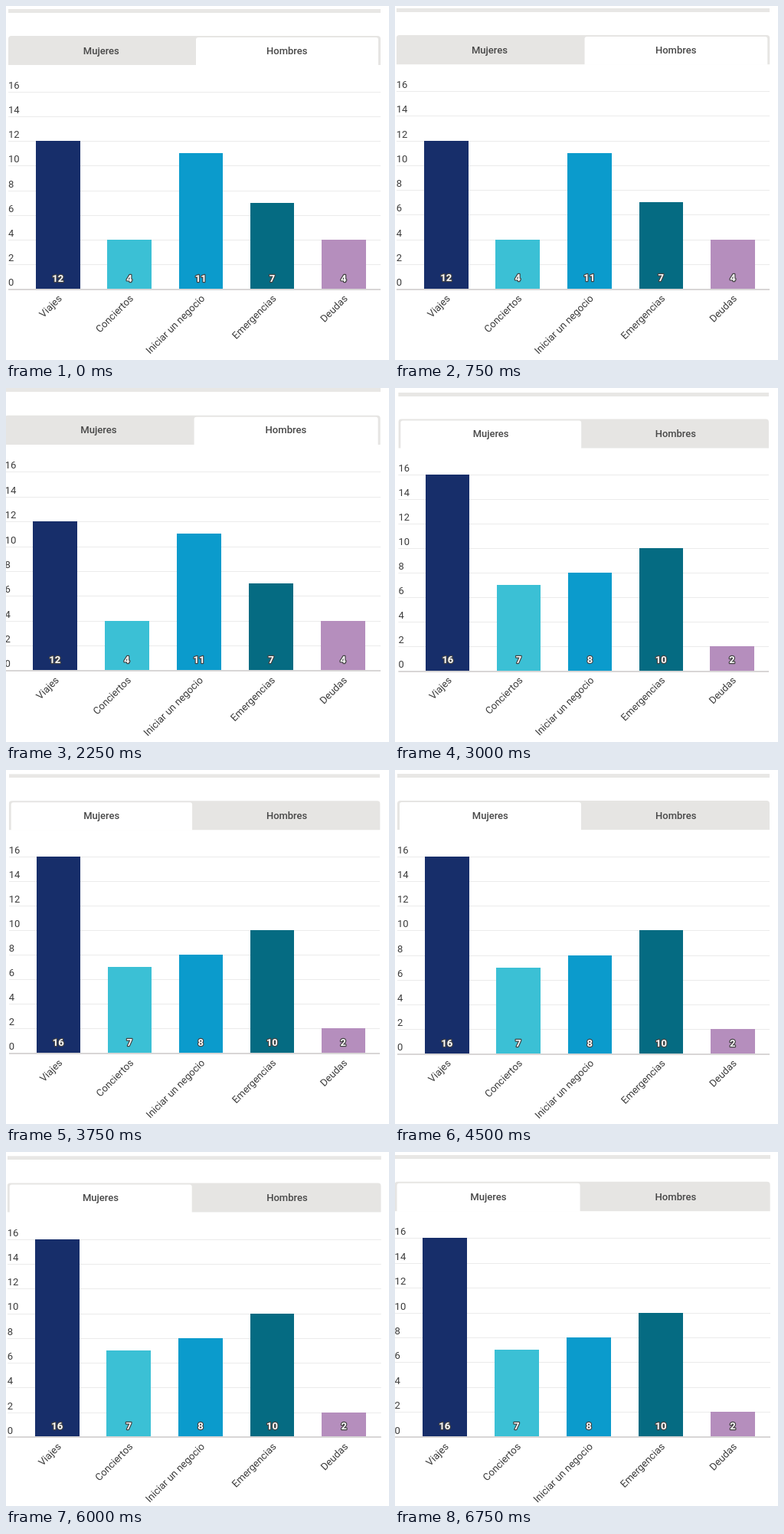
These frames come from a looping animation (500x462 px, 7500 ms). An HTML page:

```html
<!DOCTYPE html>
<html lang="es">
<head>
<meta charset="utf-8">
<style>
  html, body { margin: 0; width: 100%; height: 100%; overflow: hidden; background: #fff; }
  svg { display: block; width: 500px; height: 462px; font: 13px Roboto, Arial, sans-serif; fill: #3c3c3c; }
  rect { shape-rendering: crispEdges; }
  .tab { font-weight: 500; fill: #484848; text-anchor: middle; }
  .value { font-weight: 700; fill: #fff; stroke: #444; stroke-width: 2.4px; stroke-linejoin: round; paint-order: stroke; text-anchor: middle; }
  .category { text-anchor: end; }

  #chart { transform-origin: 0 0; animation: drift 7.5s step-end infinite; }
  #men { animation: showMen 7.5s step-end infinite; }
  #women { animation: showWomen 7.5s step-end infinite; }

  /* Slow zoom, redrawn every 750 ms, restarting when the tab changes */
  @keyframes drift {
    0%   { transform: translate(0, 0) scale(1); }
    10%  { transform: translate(-1.2px, -1.1px) scale(1.003); }
    20%  { transform: translate(-2.8px, -2.3px) scale(1.0057); }
    30%  { transform: translate(-4.5px, -3.6px) scale(1.0085); }
    40%  { transform: translate(1.4px, 1.8px) scale(.995); }
    50%  { transform: translate(.7px, 1.4px) scale(.9975); }
    60%  { transform: translate(0, 1px) scale(1); }
    70%  { transform: translate(-.6px, 1.2px) scale(1.002); }
    80%  { transform: translate(-1.3px, 1.3px) scale(1.004); }
    90%, 100% { transform: translate(-3.5px, -.5px) scale(1.0085); }
  }
  @keyframes showMen { 0% { visibility: visible; } 40%, 100% { visibility: hidden; } }
  @keyframes showWomen { 0% { visibility: hidden; } 40%, 100% { visibility: visible; } }
</style>
</head>
<body>
<svg viewBox="0 0 500 462"><g id="chart"></g></svg>
<script>
  const LEFT = 3, WIDTH = 486, BASE = 369, UNIT = 257 / 16;
  const BAR_X = 39, BAR_STEP = 93.25, BAR_WIDTH = 57.5;
  const categories = [
    ['Viajes', '#172e6a'],
    ['Conciertos', '#3bc0d5'],
    ['Iniciar un negocio', '#0b9bcc'],
    ['Emergencias', '#056b82'],
    ['Deudas', '#b58ebd'],
  ];
  const barLeft = i => BAR_X + i * BAR_STEP;
  const barMiddle = i => barLeft(i) + BAR_WIDTH / 2;

  function add(parent, tag, attrs, text = '') {
    const el = document.createElementNS('http://www.w3.org/2000/svg', tag);
    for (const name in attrs) el.setAttribute(name, attrs[name]);
    el.textContent = text;
    return parent.appendChild(el);
  }
  const rect = (parent, x, y, width, height, fill) =>
    add(parent, 'rect', { x, y, width, height, fill });

  const chart = document.getElementById('chart');

  rect(chart, LEFT, 4, WIDTH, 5, '#e8e7e5');
  add(chart, 'path', { d: 'M3 77V43q0-4 4-4H485q4 0 4 4V77z', fill: '#e6e5e3' });

  for (let n = 0; n <= 16; n += 2) {
    const y = BASE - n * UNIT;
    if (n) rect(chart, LEFT, y, WIDTH, 1, '#ebebeb');
    add(chart, 'text', { x: LEFT, y: y - 4 }, n);
  }

  function addSeries(id, values, tabX, tabWidth) {
    const group = add(chart, 'g', { id });
    add(group, 'path', {
      d: `M${tabX} 77.5V44q0-3 3-3h${tabWidth - 6}q3 0 3 3V77.5z`, fill: '#fff',
    });
    values.forEach((value, i) => {
      const height = value * UNIT;
      rect(group, barLeft(i), BASE - height, BAR_WIDTH, height, categories[i][1]);
      add(group, 'text', { class: 'value', x: barMiddle(i), y: 359.5 }, value);
    });
  }
  addSeries('men', [12, 4, 11, 7, 4], 248, 238);
  addSeries('women', [16, 7, 8, 10, 2], 6, 237);

  rect(chart, LEFT, 368.6, WIDTH, 2, '#d8d6d6');

  add(chart, 'text', { class: 'tab', x: 124.3, y: 62.5 }, 'Mujeres');
  add(chart, 'text', { class: 'tab', x: 366.8, y: 62.5 }, 'Hombres');

  categories.forEach(([label], i) => add(chart, 'text', {
    class: 'category',
    transform: `translate(${barMiddle(i) + 6} 382.5) rotate(-45)`,
  }, label));
</script>
</body>
</html>
```
